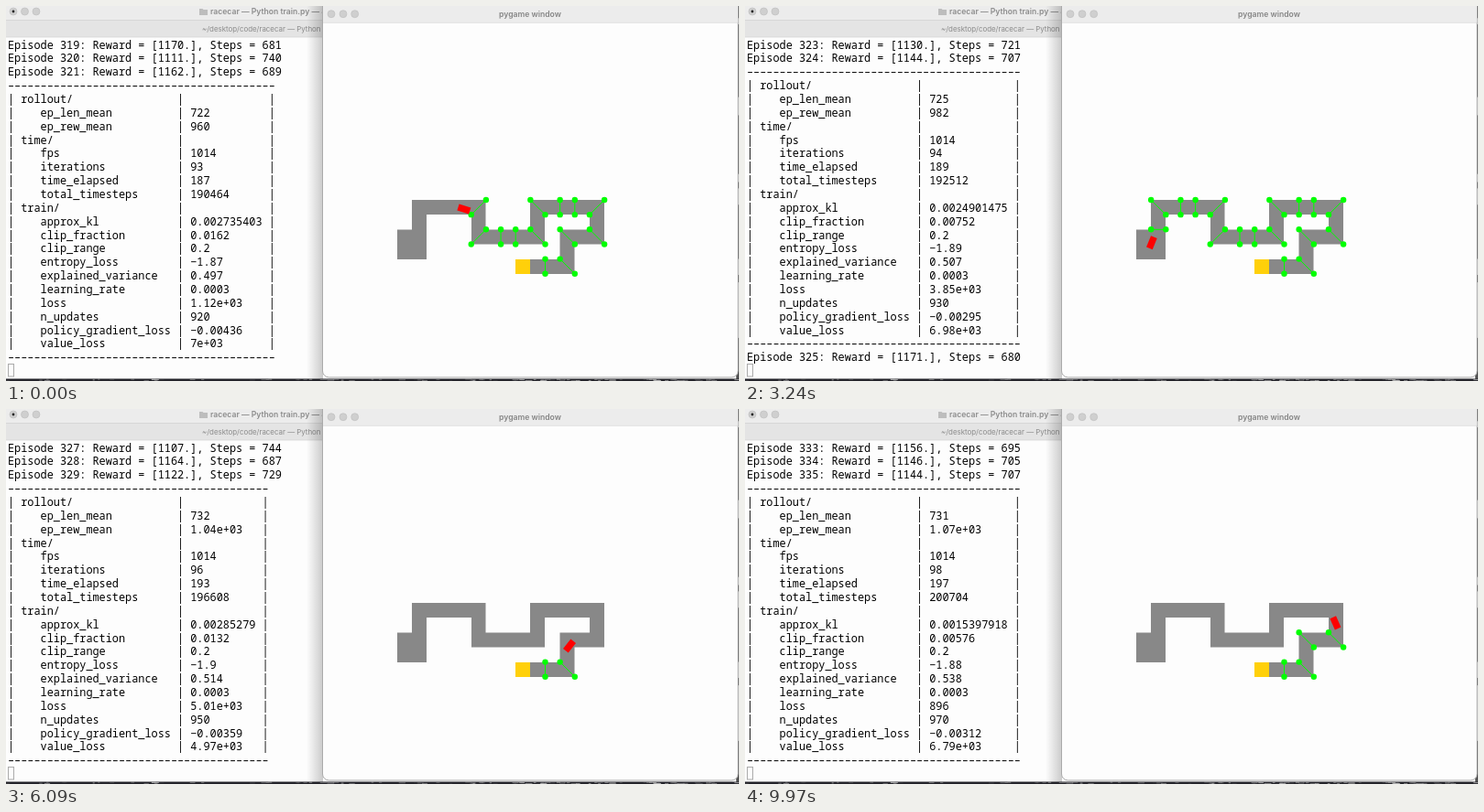
Recreate the animation shown at these times as an HTML page. Size 800 by 410 pixels, loop 10000 ms.

```html
<!DOCTYPE html>
<html lang="en">
<head>
<meta charset="utf-8">
<title>racecar training</title>
<style>
  html, body { margin: 0; width: 100%; height: 100%; overflow: hidden; background: #fdfdfd; }
  #stage { position: relative; width: 800px; height: 410px; overflow: hidden; }
  #log {
    position: absolute; left: 2px; top: 34.5px; margin: 0; color: #000;
    font: 11.87px/14.86px "Noto Sans Mono", "DejaVu Sans Mono", monospace;
    font-variant-ligatures: none; white-space: pre;
  }
  svg { position: absolute; left: 0; top: 0; }
  svg text { font-family: Inter, Roboto, sans-serif; }
  .title { font-size: 8.6px; font-weight: 600; }
</style>
</head>
<body>
<div id="stage">
  <svg width="800" height="410">
    <defs>
      <linearGradient id="shade">
        <stop offset="0" stop-color="#000" stop-opacity="0"/>
        <stop offset="1" stop-color="#000" stop-opacity=".2"/>
      </linearGradient>
    </defs>
    <rect width="800" height="34" fill="#ececec"/>
    <rect y="15.5" width="346" height="18.5" fill="#e4e4e4"/>
    <path d="M0 15.5H346M0 34H346" stroke="#d2d2d2" stroke-width=".7"/>
    <g fill="#cfcfcf" stroke="#bcbcbc" stroke-width=".6">
      <circle cx="8" cy="6" r="4"/><circle cx="20.5" cy="6" r="4"/><circle cx="33" cy="6" r="4"/>
    </g>
    <circle cx="8" cy="6" r="1.4" fill="#222"/>
    <path d="M211 3h3.5l1 1H220v6h-9z" fill="#bdbdbd"/>
    <text class="title" x="223" y="9.2" fill="#8c8c8c">racecar — Python train.py — 80×24</text>
    <text x="214" y="27.5" font-size="7.9" fill="#8a8a8a">~/desktop/code/racecar — Python train.py</text>
  </svg>
  <pre id="log"></pre>
  <svg width="800" height="410">
    <rect x="328" width="18" height="408" fill="url(#shade)"/>
    <rect x="797" width="3" height="410" fill="#555"/>
    <rect y="407.5" width="800" height="3" fill="#24242a"/>
    <g id="specks"></g>
    <rect x="345.5" y="-12" width="453.5" height="418" rx="7" fill="#fdfdfd" stroke="#aaa"/>
    <path d="M346 0H798.5V18H346z" fill="#ececec"/>
    <path d="M346 18.3H798.5" stroke="#d4d4d4" stroke-width=".7"/>
    <g fill="#cfcfcf" stroke="#bcbcbc" stroke-width=".6">
      <circle cx="355" cy="8.7" r="4"/><circle cx="368" cy="8.7" r="4"/><circle cx="380.7" cy="8.7" r="4"/>
    </g>
    <text class="title" x="572" y="11.8" text-anchor="middle" fill="#858585">pygame window</text>
    <path fill="#888" d="M427 244.5H443V212H523.5V244.5H572V212H653V260.5H620.5V293H572V277H604.5V244.5H637V228H588V260.5H508V228H459V277H427z"/>
    <rect x="556" y="277" width="16" height="16" fill="#ffd00a"/>
    <g id="gates" fill="#0f0" stroke="#0f0"></g>
    <rect id="car" x="-6.7" y="-3.6" width="13.4" height="7.2" fill="#f00"/>
  </svg>
</div>
<script>
const LOOP = 10000;
const $ = id => document.getElementById(id);

// Driving line from the start block to the finish
const line = [
  [443, 261], [448, 248], [451, 235], [458, 223], [475, 219], [500, 222], [513, 231],
  [518, 243], [528, 252], [543, 254], [565, 253], [578, 248], [581, 235], [587, 223],
  [600, 219], [624, 221.5], [637, 224], [644, 233], [646, 243], [638, 251], [626, 253],
  [615, 259], [611, 272], [603, 282], [590, 285], [572, 285]
];
const dist = [0];
for (let i = 1; i < line.length; i++)
  dist.push(dist[i - 1] + Math.hypot(line[i][0] - line[i - 1][0], line[i][1] - line[i - 1][1]));

// Column, row, direction (| - \ /) and the lap fraction at which the gate is cleared
const X0 = 427, Y0 = 212, CELL = 16.15;
const gates = [
  [1, 2, '-', .046], [1, 0, '\\', .103], [3, 0, '|', .158], [4, 0, '|', .202],
  [5, 0, '/', .254], [5, 2, '/', .319], [7, 2, '|', .373], [8, 2, '|', .417],
  [9, 2, '\\', .472], [9, 0, '\\', .543], [11, 0, '|', .598], [12, 0, '|', .645],
  [13, 0, '/', .696], [13, 2, '\\', .768], [11, 2, '\\', .837], [11, 4, '\\', .903],
  [10, 4, '|', .957]
];
const gateEls = gates.map(([c, r, dir]) => {
  const x = X0 + c * CELL, y = Y0 + r * CELL;
  const left = dir === '/' ? y + CELL : y;
  const x2 = dir === '|' ? x : x + CELL;
  const y2 = dir === '-' || dir === '/' ? y : y + CELL;
  const g = document.createElementNS('http://www.w3.org/2000/svg', 'g');
  g.innerHTML = `<path d="M${x} ${left}L${x2} ${y2}"/>` +
    [[x, left], [x2, y2]].map(p => `<circle cx="${p[0]}" cy="${p[1]}" r="3.2" stroke="none"/>`).join('');
  $('gates').append(g);
  return g;
});

// Time in ms -> laps driven; flat stretches are the pauses for training
const laps = [
  [0, .226], [656, .226], [1550, 2.653], [1734, 3.138], [2921, 3.138], [3240, 4.004],
  [3999, 5.957], [4204, 5.957], [4360, 6.381], [5282, 8.844], [6235, 8.844],
  [7313, 11.773], [8266, 11.773], [8520, 12.479], [9344, 14.722], [LOOP, 14.722]
];
function lapAt(t) {
  const i = laps.findIndex(k => k[0] > t);
  const [t0, a] = laps[i - 1], [t1, b] = laps[i];
  return a + (b - a) * (t - t0) / (t1 - t0);
}

// Printed output, each line with the lap count at which it appears
const output = [];
const print = (lap, text) => output.push({ lap, text });
const firstEpisode = 319;
const steps = [681, 740, 689, 672, 721, 707, 680, 750, 744, 687, 729, 698, 707, 706, 695, 705, 707];
// lap, ep_len, ep_rew, approx_kl, clip_fraction, entropy, variance, loss, policy loss, value loss
const updates = [
  [0, '722', '960', '0.002735403', '0.0162', '−1.87', '0.497', '1.12e+03', '−0.00436', '7e+03'],
  [3.138, '725', '982', '0.0024901475', '0.00752', '−1.89', '0.507', '3.85e+03', '−0.00295', '6.98e+03'],
  [5.957, '727', '1e+03', '0.0036596656', '0.00903', '−1.89', '0.561', '4.19e+03', '−0.00326', '6.53e+03'],
  [8.844, '732', '1.04e+03', '0.00285279', '0.0132', '−1.9', '0.514', '5.01e+03', '−0.00359', '4.97e+03'],
  [11.773, '734', '1.07e+03', '0.0018100329', '0.00752', '−1.88', '0.544', '1.93e+03', '−0.0019', '6.37e+03'],
  [14.722, '731', '1.07e+03', '0.0015397918', '0.00576', '−1.88', '0.538', '896', '−0.00312', '6.79e+03']
];
steps.forEach((n, i) =>
  print(i - 2, `Episode ${firstEpisode + i}: Reward = [${1851 - n}.], Steps = ${n}`));
updates.forEach(([lap, len, rew, kl, clip, entropy, variance, loss, policy, value], i) => {
  const iter = 93 + i, width = kl.length;
  const rule = '–'.repeat(30 + width);
  const rows = [
    ['rollout/'], ['ep_len_mean', len], ['ep_rew_mean', rew],
    ['time/'], ['fps', 1014], ['iterations', iter], ['time_elapsed', 187 + 2 * i],
    ['total_timesteps', iter * 2048],
    ['train/'], ['approx_kl', kl], ['clip_fraction', clip], ['clip_range', 0.2],
    ['entropy_loss', entropy], ['explained_variance', variance], ['learning_rate', 0.0003],
    ['loss', loss], ['n_updates', (iter - 1) * 10], ['policy_gradient_loss', policy],
    ['value_loss', value]
  ];
  print(lap, rule);
  for (const [key, val] of rows) {
    const name = val === undefined ? key : '   ' + key;
    print(lap, `| ${name.padEnd(23)} | ${String(val ?? '').padEnd(width)} |`);
  }
  print(lap, rule);
});
output.sort((a, b) => a.lap - b.lap);

// Desktop texture along the bottom and right edges
let seed = 7;
const rand = () => (seed = seed * 16807 % 2147483647) / 2147483647;
let specks = '';
for (let i = 0; i < 110; i++)
  specks += `<rect x="${rand() * 800}" y="${407.5 + rand() * 2}" width="${2 + rand() * 6}" height=".8" fill="#bbb" opacity="${rand()}"/>`;
for (let i = 0; i < 16; i++)
  specks += `<rect x="799" y="${rand() * 400}" width="1" height="${4 + rand() * 16}" fill="#ddd"/>`;
$('specks').innerHTML = specks +
  '<rect x="2.5" y="391.5" width="6" height="13.5" fill="none" stroke="#aaa"/>';

function moveCar(p) {
  const s = p * dist[dist.length - 1], last = line.length - 1;
  let i = 0;
  while (i < last - 1 && dist[i + 1] < s) i++;
  const h = dist[i + 1] - dist[i], k = (s - dist[i]) / h;
  const slope = (j, axis) => {
    const a = Math.max(j - 1, 0), b = Math.min(j + 1, last);
    return (line[b][axis] - line[a][axis]) / (dist[b] - dist[a]) * h;
  };
  const [x, y, dx, dy] = [0, 1].map(axis => {
    const a = line[i][axis], b = line[i + 1][axis], m = slope(i, axis), n = slope(i + 1, axis);
    const c2 = 3 * (b - a) - 2 * m - n, c3 = 2 * (a - b) + m + n;
    return [a + k * (m + k * (c2 + k * c3)), m + k * (2 * c2 + 3 * k * c3)];
  }).reduce((u, v) => [u[0], v[0], u[1], v[1]]);
  const angle = Math.atan2(dy, dx) * 180 / Math.PI;
  $('car').setAttribute('transform', `translate(${x} ${y}) rotate(${angle})`);
}

let shown = -1;
function draw() {
  const lap = lapAt(performance.now() % LOOP), p = lap % 1;
  moveCar(p);
  gateEls.forEach((g, i) => g.style.display = p < gates[i][3] ? '' : 'none');
  const count = output.filter(o => o.lap <= lap + 1e-6).length;
  if (count !== shown) {
    shown = count;
    $('log').textContent = output.slice(count - 24, count).map(o => o.text).join('\n');
  }
  requestAnimationFrame(draw);
}
draw();
</script>
</body>
</html>
```
